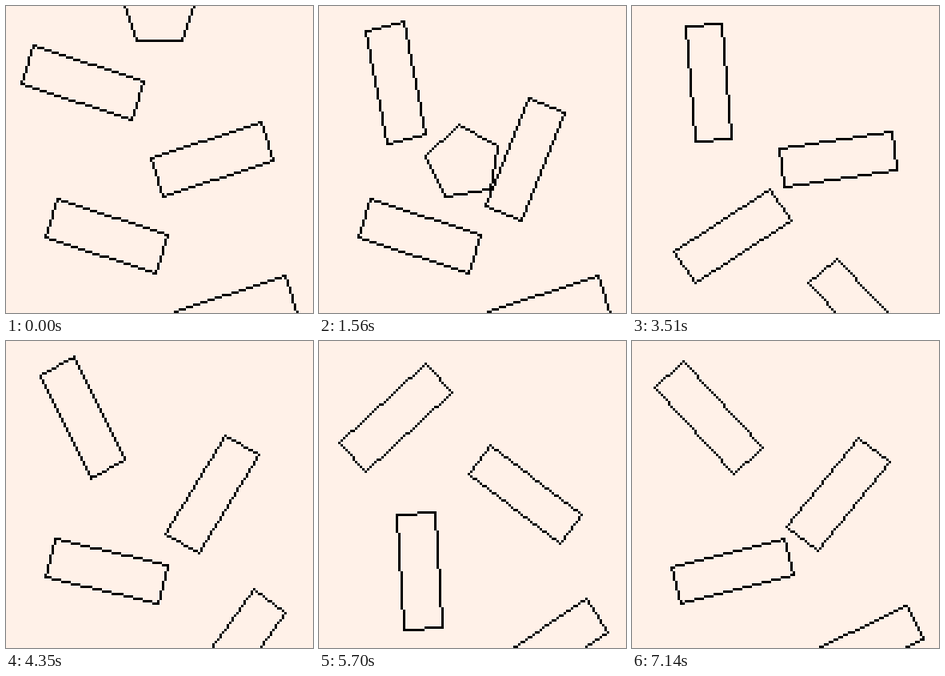
Write an HTML page with a canvas that moves like this. It is 384 px wide and 384 px high and loops after 7170 ms.

```html
<!DOCTYPE html>
<html>
<head>
<meta charset="utf-8">
<title>Falling pentagon</title>
<style>
html, body { margin: 0; height: 100%; overflow: hidden; background: #fff1e8; }
canvas { display: block; width: 100vw; height: 100vh; image-rendering: pixelated; }
</style>
</head>
<body>
<canvas width="128" height="128"></canvas>
<script>
const ctx = document.querySelector('canvas').getContext('2d');
const LOOP = 7170, STEP = 30, GRAVITY = 278, HEAD_START = .09, TILT = 18;
const rad = degrees => degrees * Math.PI / 180;

// Each collision adds spin (degrees/s) to a bar, and velocity and spin to the pentagon.
const hits = [
  { t: .282, bar: 0, turn: 188.1, vx: 0, vy: -33, spin: 50.6 },
  { t: .57, bar: 1, turn: -50.7, vx: -3.5, vy: -274, spin: 0 },
  { t: 1.56, bar: 1, turn: -10.7, vx: 16.7, vy: -62, spin: -48 },
  { t: 1.72, bar: 2, turn: 107.4, vx: 0, vy: -217, spin: 0 },
  { t: 2.3, bar: 2, turn: -52.6, vx: 0, vy: 0, spin: 0 },
  { t: 2.545, bar: 3, turn: -119.3, vx: 0, vy: -113, spin: 0 }
];

const box = [[-24, -8], [24, -8], [24, 8], [-24, 8]];
const pentagon = [0, 1, 2, 3, 4].map(i => [16 * Math.sin(rad(72 * i)), -16 * Math.cos(rad(72 * i))]);

// Total change of a quantity at time t, given the speed each hit adds to it.
const moved = (t, key, list = hits) =>
  list.reduce((sum, h) => sum + h[key] * Math.max(0, t - h.t), 0);

function line([x0, y0], [x1, y1]) {
  const dx = x1 - x0, dy = y1 - y0, n = Math.max(Math.abs(dx), Math.abs(dy), 1);
  for (let i = 0; i <= n; i++)
    ctx.fillRect(Math.round(x0 + dx * i / n), Math.round(y0 + dy * i / n), 1, 1);
}

function outline(shape, x, y, degrees) {
  const c = Math.cos(rad(degrees)), s = Math.sin(rad(degrees));
  const pts = shape.map(([px, py]) => [Math.floor(x + px * c - py * s), Math.floor(y + px * s + py * c)]);
  pts.forEach((p, i) => line(p, pts[(i + 1) % pts.length]));
}

function draw(ms) {
  const t = Math.floor(ms % LOOP / STEP) * STEP / 1000;
  ctx.fillStyle = '#fff1e8';
  ctx.fillRect(0, 0, 128, 128);
  ctx.fillStyle = '#000';

  // Bars alternate left and right, tilted towards the middle.
  for (let i = 0; i < 4; i++) {
    const right = i % 2;
    const x = 32 + 54 * right + 5 * (i - right), y = 32 + 32 * i;
    const turn = moved(t, 'turn', hits.filter(h => h.bar === i));
    outline(box, x, y, (right ? -TILT : TILT) + turn);
  }

  const fall = GRAVITY / 2 * (t + HEAD_START) ** 2;
  outline(pentagon, 64 + moved(t, 'vx'), fall + moved(t, 'vy'), moved(t, 'spin'));
}

const start = performance.now();
function tick() {
  draw(performance.now() - start);
  requestAnimationFrame(tick);
}
tick();
</script>
</body>
</html>
```
